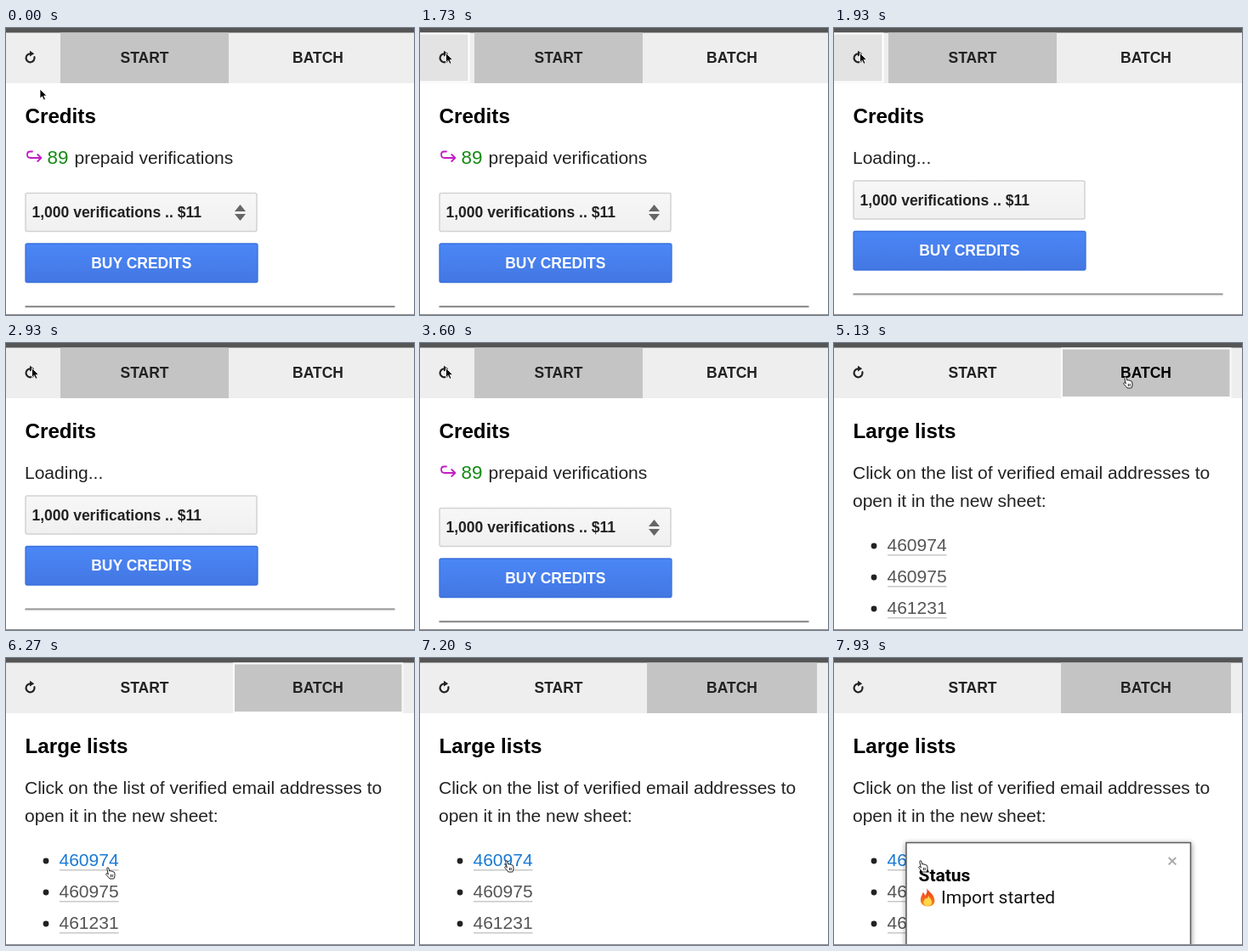
These frames come from a looping animation (480x338 px, 8 s). An HTML page:

```html
<!DOCTYPE html>
<html lang="en">
<head>
<meta charset="utf-8">
<title>Verification sidebar</title>
<style>
  html, body { margin: 0; width: 100%; height: 100%; overflow: hidden; background: #fff; }
  svg { display: block; width: 100vw; height: 100vh; }
  text { font-family: "Liberation Sans", Arial, sans-serif; fill: #222; }
  .b { font-weight: bold; font-size: 17.5px; }
  .h { font-weight: bold; font-size: 24.2px; fill: #000; }
  .p { font-size: 21px; }
  .mid { text-anchor: middle; }
  .link { fill: #555; }
  .dlg text { font-family: Roboto, sans-serif; font-size: 21px; fill: #111; }
  .line { fill: none; stroke-linecap: round; stroke-linejoin: round; }
</style>
</head>
<body>
<svg viewBox="0 0 480 338" preserveAspectRatio="none">
  <defs>
    <linearGradient id="blue" x2="0" y2="1">
      <stop stop-color="#4b87f7"/><stop offset="1" stop-color="#4377e2"/>
    </linearGradient>
    <linearGradient id="grey" x2="0" y2="1">
      <stop stop-color="#f7f7f7"/><stop offset="1" stop-color="#f0f0f0"/>
    </linearGradient>
    <linearGradient id="fire" x2="0" y2="1">
      <stop stop-color="#e8341c"/><stop offset="1" stop-color="#ff8a1e"/>
    </linearGradient>
    <filter id="soft" x="-10%" y="-10%" width="120%" height="120%">
      <feGaussianBlur stdDeviation="3"/>
    </filter>
  </defs>

  <rect width="480" height="338" fill="#fff"/>

  <!-- tab bar -->
  <rect y="5" width="480" height="60" fill="#eee"/>
  <rect width="480" height="5.5" fill="#555"/>
  <rect id="startBg" x="64" y="5.5" width="198" height="59.5" fill="#c4c4c4"/>
  <rect id="batchBg" x="267" y="5.5" width="200" height="59.5" fill="#c4c4c4"/>
  <rect id="batchRing" x="268" y="6.5" width="198.5" height="57.5" fill="none" stroke="#fafafa" stroke-width="2"/>
  <rect id="reloadRing" x="-2" y="6.5" width="59.5" height="57" fill="#e3e3e3" stroke="#fff" stroke-width="2"/>
  <path class="line" d="M33.4 34.2A5 5 0 1 1 28.5 30.3" stroke="#222" stroke-width="2.2"/>
  <path d="M28 26.8L33.2 30.2L28 33.6Z" fill="#222"/>
  <text class="b mid" x="163" y="41">START</text>
  <text class="b mid" id="batchText" x="367" y="41">BATCH</text>

  <!-- credits page -->
  <g id="credits">
    <text class="h" x="22.5" y="112">Credits</text>
    <text class="p" id="loading" x="22" y="159.5">Loading...</text>
    <g id="balance">
      <path class="line" d="M31 145.5H28.5Q25 145.5 25 149Q25 153 29 153H41M37.2 149L41.4 153L37.2 157" stroke="#c41bc4" stroke-width="1.8"/>
      <text x="48.5" y="160" style="font-size:22.4px;fill:#158a15">89</text>
      <text class="p" x="80.5" y="160">prepaid verifications</text>
    </g>
    <g id="form">
      <rect x="23" y="194.5" width="272" height="45" rx="2" fill="url(#grey)" stroke="#d2d2d2" stroke-width="1.5"/>
      <text class="b" x="30.5" y="223">1,000 verifications .. $11</text>
      <path id="arrows" d="M269 216L275.5 208L282 216ZM269 219L275.5 227L282 219Z" fill="#666"/>
      <rect x="23" y="254" width="273" height="45.5" rx="2" fill="url(#blue)" stroke="#3a70dc" stroke-width="1.3"/>
      <text class="b mid" x="159.3" y="282.5" style="fill:#fff">BUY CREDITS</text>
      <rect x="22.5" y="327" width="435" height="2" fill="#909090"/>
      <rect x="22.5" y="329" width="435" height="1" fill="#e4e4e4"/>
    </g>
  </g>

  <!-- lists page -->
  <g id="lists">
    <text class="h" x="22.5" y="112">Large lists</text>
    <text class="p" x="22" y="159.5">Click on the list of verified email addresses to</text>
    <text class="p" x="22" y="192.5">open it in the new sheet:</text>
    <g id="items"></g>
  </g>

  <!-- dialog -->
  <g id="dialog" class="dlg">
    <rect x="84" y="218" width="337" height="150" fill="#000" opacity=".38" filter="url(#soft)"/>
    <rect x="85" y="217.5" width="334.5" height="150" fill="#fff" stroke="#5c5c5c" stroke-width="1.5"/>
    <path d="M393.7 235L402.3 243.4M402.3 235L393.7 243.4" stroke="#aaa" stroke-width="2"/>
    <g id="message">
      <text x="99.5" y="263" style="font-weight:bold;fill:#000">Status</text>
      <path d="M109 271C111 275 116 277 117.5 282C120 288 117 292.500 110.500 292.500C104 292.500 101 288 102 283C102.500 280 104 279 104.500 276C106 277 107 278.500 107 280C109.500 277.500 110 274 109 271Z" fill="url(#fire)"/>
      <path d="M111 279.500C112 283 115.500 284 115 288C114.600 291 112.500 292 110.500 292C107 292 105 290 105.500 287C105.800 285 107 284.500 107.500 283C109.500 284 111 282.500 111 279.500Z" fill="#ffd84a"/>
      <text x="126" y="289">Import started</text>
    </g>
  </g>

  <rect y="337" width="480" height="1" fill="#8c8c8c"/>

  <path id="arrow" d="M0 0V11L2.600 8.700L4.500 12.800L6.400 12L4.600 7.900H8Z" fill="#000" stroke="#fff" stroke-width=".8"/>
  <path id="hand" class="line" d="M3.200 8.500L1.800 2.200Q1.600 .8 2.700 .7Q3.700 .6 4 2L4.700 5Q6 4 7 5.200Q8.300 4.600 9 5.800Q10.600 5.600 10.800 7.500L11 10Q11 12 9.800 14H5Q3.600 12.200 1 9.300Q.2 8 1.300 7.600Q2.300 7.500 3.200 8.500ZM6.300 9.300V11.600M8.200 9.300V11.600" style="fill:#fff" stroke="#222" stroke-width="1"/>
</svg>
<script>
  const LOOP = 8000;
  const $ = id => document.getElementById(id);
  const show = (id, on) => $(id).setAttribute("opacity", +on);
  const place = (id, x, y) => $(id).setAttribute("transform", `translate(${x} ${y})`);
  const between = (t, a, b) => t >= a && t < b;
  const ramp = (t, a, b) => Math.min(1, Math.max(0, (t - a) / (b - a)));

  $("items").innerHTML = ["460974", "460975", "461231"].map((n, i) => {
    const y = 37 * i;
    return `<circle cx="47" cy="${239 + y}" r="3.4" fill="#222"/>
      <text class="p link" x="62.5" y="${245 + y}">${n}</text>
      <rect x="63" y="${249 + y}" width="69.500" height="1.500" fill="#c8c8c8"/>`;
  }).join("");
  const firstLink = document.querySelector(".link");

  // time, x, y
  const arrowPath = [[0, 40, 72], [230, 40, 72], [600, 31, 30], [1700, 31, 30], [1730, 30.5, 29.5]];
  const handPath = [[3940, 27, 30], [4330, 287, 37], [4600, 340, 39], [5750, 340, 39],
    [6270, 117, 246], [6600, 121, 242], [6730, 99, 238]];

  function follow(path, t) {
    const i = path.findIndex(k => k[0] > t);
    if (i < 0) return path[path.length - 1].slice(1);
    if (i === 0) return path[0].slice(1);
    const [a, b] = [path[i - 1], path[i]];
    const u = ramp(t, a[0], b[0]);
    const e = u * u * (3 - 2 * u);
    return [a[1] + (b[1] - a[1]) * e, a[2] + (b[2] - a[2]) * e];
  }

  function draw(t) {
    const loading = between(t, 1930, 3400);
    const batch = t >= 5000;
    const listed = t >= 5060;
    const pointing = t >= 4000;

    show("startBg", !batch);
    show("batchBg", batch);
    show("batchRing", between(t, 5000, 7070));
    show("reloadRing", t < 2930 ? ramp(t, 950, 1200) : 0);
    $("batchText").style.fill = between(t, 4400, 5860) ? "#000" : "#222";

    show("credits", !listed);
    show("lists", listed);
    show("loading", loading);
    show("balance", !loading);
    show("arrows", !loading);
    place("form", 0, loading ? -14.5 : 0);

    firstLink.style.fill = t >= 6180 ? "#1a7ad4" : "#555";
    show("dialog", ramp(t, 7620, 7800));
    show("message", t >= 7860);

    show("arrow", !pointing);
    show("hand", pointing);
    place("arrow", ...follow(arrowPath, t));
    place("hand", ...follow(handPath, t));
  }

  const begin = performance.now();
  function tick() {
    draw((performance.now() - begin) % LOOP);
    requestAnimationFrame(tick);
  }
  tick();
</script>
</body>
</html>
```
